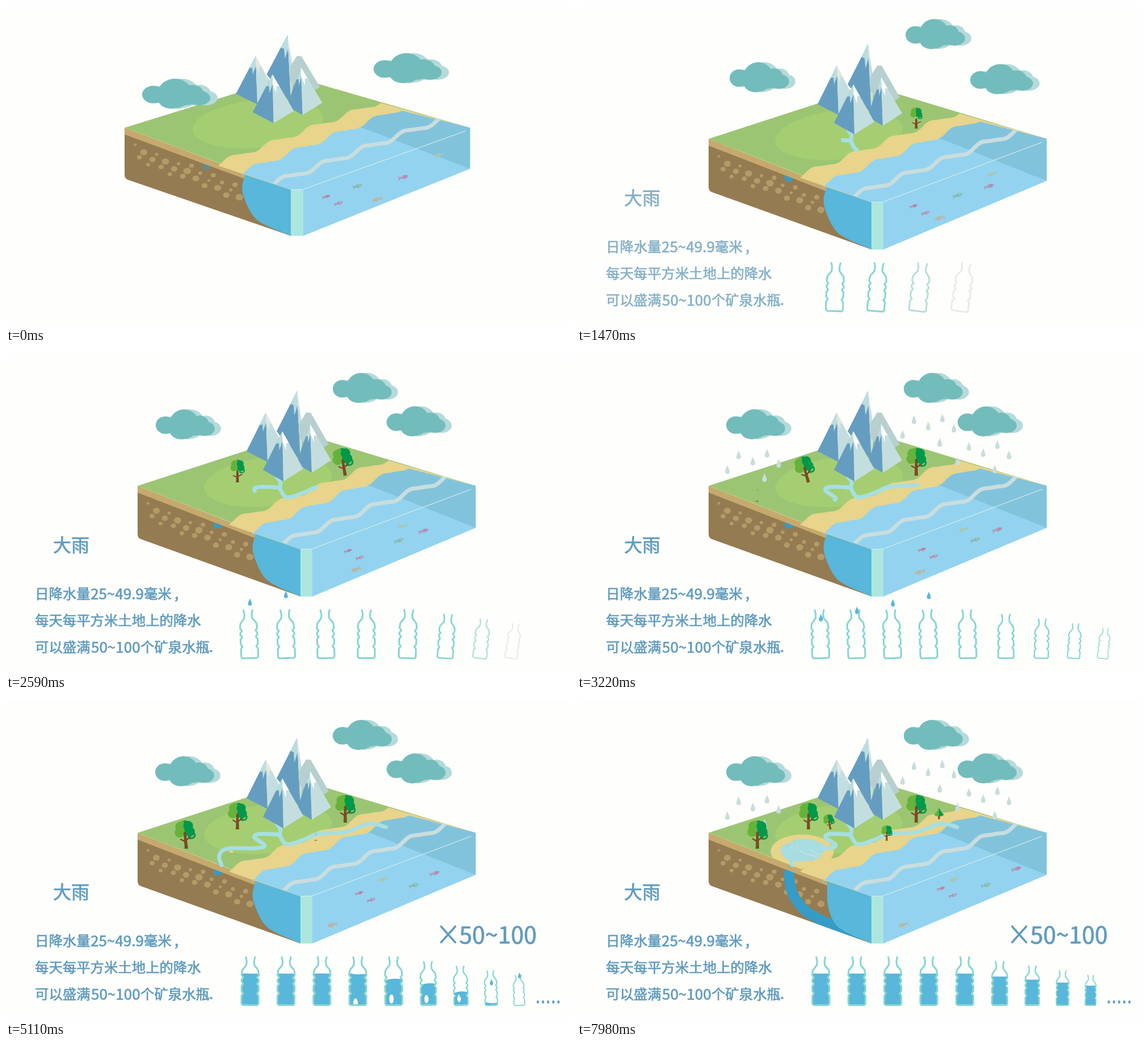
An HTML page with a canvas that plays this animation: 996x562 px, repeating every 8000 ms.

```html
<!DOCTYPE html>
<html lang="zh">
<head>
<meta charset="utf-8">
<style>
html, body { margin: 0; width: 100%; height: 100%; overflow: hidden; background: #fefefc; }
canvas { display: block; }
</style>
</head>
<body>
<canvas id="stage" width="996" height="562"></canvas>
<script>
const ctx = document.getElementById('stage').getContext('2d');
const LOOP = 8000;
const FONT = '"Noto Sans CJK SC", "Noto Sans CJK", sans-serif';
const BLUE = [95, 155, 190], CREAM = [240, 237, 229], TEAL = [132, 214, 208];

// Linear keyframes: time, value, time, value, ...
function at(t, ...k) {
  if (t <= k[0]) return k[1];
  for (let i = 2; i < k.length; i += 2)
    if (t < k[i]) return k[i - 1] + (k[i + 1] - k[i - 1]) * (t - k[i - 2]) / (k[i] - k[i - 2]);
  return k[k.length - 1];
}
const mix = (a, b, p) => `rgb(${a.map((v, i) => Math.round(v + (b[i] - v) * p))})`;

function fill(color, path) {
  ctx.fillStyle = color;
  ctx.fill(path instanceof Path2D ? path : new Path2D(path));
}
function stroke(color, width, path) {
  ctx.strokeStyle = color;
  ctx.lineWidth = width;
  ctx.stroke(path instanceof Path2D ? path : new Path2D(path));
}
function oval(color, x, y, rx, ry = rx) {
  ctx.fillStyle = color;
  ctx.beginPath();
  ctx.ellipse(x, y, rx, ry, 0, 0, 7);
  ctx.fill();
}
function placed(x, y, draw, sx = 1, sy = sx, degrees = 0) {
  ctx.save();
  ctx.translate(x, y);
  ctx.rotate(degrees * Math.PI / 180);
  ctx.scale(sx, sy);
  draw();
  ctx.restore();
}
function clipped(path, draw) {
  ctx.save();
  ctx.clip(path);
  draw();
  ctx.restore();
}
const polygon = (points, rest = '') => new Path2D('M' + points.join('L') + rest);

// Smooth curve through a few points, STEPS samples for each span
const STEPS = 12;
function curve(...points) {
  const out = [], last = points.length - 1;
  const pt = i => points[Math.max(0, Math.min(last, i))];
  for (let s = 0; s <= last * STEPS; s++) {
    const i = Math.min(last - 1, Math.floor(s / STEPS)), u = s / STEPS - i;
    out.push([0, 1].map(c => {
      const [a, b, d, e] = [-1, 0, 1, 2].map(k => pt(i + k)[c]);
      return b + u / 2 * (d - a + u * (2 * a - 5 * b + 4 * d - e + u * (3 * (b - d) + e - a)));
    }));
  }
  return out;
}
const trace = (points, spans) => polygon(points.slice(0, Math.round(spans * STEPS) + 1));

// Skewed ripple along the line from (x0, y0) to (x1, y1), steepest at x = crest
function ripple(x0, y0, x1, y1, crest) {
  return Array.from({ length: 141 }, (_, i) => {
    const x = x0 + (x1 - x0) * i / 140, a = (x - crest) / 69 * 2 * Math.PI;
    return [x, y0 + (y1 - y0) * i / 140 - 4.5 * (Math.sin(a) + .25 * Math.sin(2 * a))];
  });
}
const SAND = polygon(ripple(393, 298, 674, 187, 471), 'L828,234L519,346Z');
const seaShore = ripple(432, 315, 710, 199, 512);
const SEA = polygon(seaShore, 'L828,234V308L540,429V345L519,346L441,318Z');
const FAR_SEA = polygon([[634, 231], ...seaShore.filter(p => p[0] > 640)], 'L828,234V308Z');
const FOAM = polygon(ripple(486, 335, 779, 219, 631));
const TOP = new Path2D('M232,234L519,141L828,234L519,346Z');
const SIDE = new Path2D('M232,238L519,346V429L238,328Q232,326 232,319Z');

const trunk = curve([478, 219], [484, 228], [482, 237]);
const leftBranch = curve([482, 237], [447, 236], [438, 242], [456, 256], [440, 261], [390, 262], [376, 274], [380, 291]);
const rightBranch = curve([482, 237], [495, 254], [525, 246], [550, 236], [600, 232], [640, 218], [670, 224]);
const channel = curve([373, 299], [378, 335], [397, 366], [425, 385], [465, 402], [500, 414]);

function drawStones() {
  for (let i = 0; i < 25; i++) {
    const x = 250 + i * 7.5, depth = 28 + i * .618 % 1 * 32;
    oval('#b39b68', x, 238 + (x - 232) * .377 + depth - 8, 2.5 + i * .414 % 1 * 4.3, 2.4 + i * .414 % 1 * 3.6);
  }
}

// Two faces and a zigzag snow cap, placed by fractions of the slopes
function mountain(peak, left, base, right, snow) {
  const down = (side, towardBase, u) => peak.map((p, i) => p + (side[i] + (base[i] - side[i]) * towardBase - p) * u);
  const cap = side => polygon([peak, down(side, 0, .32), down(side, .35, .28), down(side, .6, .42), down(side, 1, .2)], 'Z');
  fill('#659dc0', polygon([peak, left, base], 'Z'));
  fill('#c4dedf', polygon([peak, base, right], 'Z'));
  fill('#b9dedf', cap(left));
  fill(snow, cap(right));
}

function drawMountains() {
  mountain([513, 67], [477, 138], [519, 190], [524, 140], '#e6e6df');
  fill('#b8cfcf', 'M529,105H537L569,161L545,176L517,150V125Z');
  mountain([458, 105], [424, 173], [461, 192], [490, 166], '#e6e6df');
  mountain([536, 125], [512, 195], [539, 211], [573, 189], '#fff');
  mountain([487, 138], [453, 206], [489, 226], [524, 204], '#fff');
}

function drawBlock(t) {
  ctx.lineCap = 'butt';
  fill('#957b51', SIDE);
  drawStones();
  ctx.globalAlpha = at(t, 0, .55, 500, 1);
  fill('#349cc6', 'M365,298L381,304L378,309L368,309Z');
  ctx.globalAlpha = 1;
  if (t > 5950) clipped(SIDE, () => stroke('#349cc6', at(t, 5950, 10, 7900, 18), trace(channel, at(t, 5950, .3, 7700, 5))));
  fill('#c6a96c', 'M232,234L441,316V327L232,246Z');
  const bulge = at(t, 7560, 1, 7940, 0);
  fill('#58b7da', `M441,318Q${441 - 8 * bulge},335 ${441 - 6 * bulge},350C${442 - 2 * bulge},368 448,388 460,400C474,411 496,419 519,429V346Z`);

  fill('#9cc573', TOP);
  placed(462, 227, () => oval('#a5ce72', 0, 0, 113, 43), 1, 1, -6);
  fill('#e8d48b', SAND);
  drawPond(t);
  fill('#93d3ef', SEA);
  fill('#82c3dc', FAR_SEA);
  clipped(TOP, () => stroke('#c9dddd', 7, FOAM));
  fill('#abe7df', 'M519,346L540,345V429H519Z');
  stroke('#d9edea', 1.2, 'M519,346L540,345L820,240');
  drawFish(t);

  ctx.lineCap = ctx.lineJoin = 'round';
  const river = (points, spans) => { if (spans > 0) stroke('#a6dfe3', 7, trace(points, spans)); };
  river(trunk, at(t, 600, 0, 950, 2));
  river(leftBranch, at(t, 1000, 0, 2030, 1, 3220, 3.3, 4700, 7));
  river(rightBranch, at(t, 1000, 0, 2030, 2, 4400, 6));
  drawMountains();
}

function drawPond(t) {
  const bank = at(t, 4950, 0, 6860, .8, 7700, 1);
  const water = at(t, 5900, 0, 6860, .68, 7800, 1);
  clipped(TOP, () => oval('#e8d48b', 397, 267, 55.5 * bank, 30 * bank));
  placed(398, 264, () => {
    fill('#a8dcdf', 'M-40,2Q-36,-12 -22,-12Q-14,-22 2,-19Q16,-21 23,-15Q40,-13 40,0Q34,6 31,12Q20,22 6,19Q-12,24 -22,17Q-32,18 -35,10Z');
    if (t > 7200) stroke('#cfe2e2', 1.5, 'M-22,-6Q-16,-1 -10,0T2,5T14,9T28,16M-12,-9Q-5,-3 2,-3T18,3T30,8');
  }, water);
}

function fish(color, belly, x, y, size, facing = 1) {
  placed(x, y, () => {
    fill(color, 'M-9,-3Q-6,0 -9,4L-4,1Q2,6 8,0Q3,-5 -4,-1Z');
    oval(belly, 3, 0, 2.6, 1.8);
  }, size * facing, size, -17);
}

function drawFish(t) {
  const p = t / LOOP, dx = -7 + 76 * p - 14 * p * p, dy = -.42 * dx;
  fish('#b28fb3', '#bd809c', 587 + dx, 355 + dy, .9);
  fish('#b28fb3', '#c4a9c4', 608 + dx, 367 + dy, .95);
  fish('#ab9dbd', '#b58aa9', 720 + dx, 320 + dy, 1.15);
  const green = 1 - (1 - Math.min(1, t / 6000)) ** 2;
  const yellow = Math.min(1, t / 3800), orange = Math.min(1, t / 4700);
  fish('#83b9b5', '#9cc3ac', 634 + 87 * green, 339 - 13 * green, 1.1);
  fish('#a5c8b4', '#b2c7a6', 774 - 110 * yellow, 283 + 33 * yellow, 1.05, -1);
  fish('#b4b8aa', '#c3b49b', 668 - 93 * orange, 363 + 33 * orange, 1.15, -1);
}

function tree(t, x, y, size, start) {
  const age = t - start;
  if (age < 0) return;
  const grown = at(age, 40, .05, 280, .38, 1150, .94, 1500, 1);
  const lean = at(age, 1180, 0, 1450, -16, 2200, 0);
  placed(x, y, () => {
    placed(0, at(age, 40, -20, 1100, -31), () => {
      for (const [color, side] of [['#67b23a', -1], ['#00984a', 1]]) {
        oval(color, 9 * side, 2, 8.5);
        oval(color, 7 * side, -8, 8.5);
        fill(color, `M0,-18Q${8 * side},-18 ${9 * side},-12V9H0Z`);
      }
      stroke('#00984a', 3, 'M8,5Q16,3 17,8Q17,14 10,14Q6,14 6,11');
    }, grown);
    placed(0, 0, () => {
      fill('#7a4b23', 'M-3,0L-2,-29H2L3,0Z');
      stroke('#7a4b23', 2.4, 'M0,-12L-8,-17M0,-14L9,-20');
    }, at(age, 0, .6, 1100, 1), grown);
  }, size, size, lean);
}

function sapling(t, x, y, start) {
  placed(x, y, () => {
    fill('#7a4b23', 'M-1.5,0V-10H1.5V0Z');
    fill('#67b23a', 'M0,-20Q-4,-12 -9,-8Q-5,-4 0,-5Z');
    fill('#00984a', 'M0,-20Q4,-12 9,-8Q5,-4 0,-5Z');
  }, at(t, start, 0, start + 330, 1));
}

function drawTrees(t) {
  tree(t, 598, 216, 1, 840);
  tree(t, 408, 228, .96, 1750);
  tree(t, 318, 262, 1.02, 3180);
  tree(t, 447, 228, .55, 6600);
  tree(t, 546, 248, .55, 5050);
  sapling(t, 638, 210, 7650);
}

function cloud(x, y, width) {
  const puffs = (color, dx) => {
    oval(color, 17 + dx, 28, 17, 15.5);
    oval(color, 50 + dx, 26, 26);
    oval(color, 45 + dx, 38, 20, 15);
    oval(color, 77 + dx, 27, 17, 16);
    oval(color, 86 + dx, 34, 18, 13);
    oval(color, 62 + dx, 33, 30, 14);
  };
  placed(x, y, () => { puffs('#b5dada', 11); puffs('#73bcbc', 0); }, width / 115, 1);
}

function drawClouds(t) {
  const width = at(t, 0, 133, 910, 117, 2000, 115);
  cloud(at(t, 0, 240, 910, 269, 2030, 269, 2700, 263), at(t, 0, 128, 910, 98, 2030, 100, 2700, 99), width);
  cloud(at(t, 0, 648, 910, 587, 1700, 576), at(t, 0, 83, 910, 30, 1350, 17, 1720, 35), width);
  ctx.globalAlpha = at(t, 650, 0, 850, 1);
  cloud(at(t, 650, 752, 910, 731, 1900, 664, 2600, 671), at(t, 650, 150, 910, 129, 1900, 82, 2600, 94),
    at(t, 910, 130, 2030, 115));
  ctx.globalAlpha = 1;
}

function drop(color, x, y, size = 1) {
  placed(x, y, () => fill(color, 'M0,-8C1,-4 4,0 4,3.5A4,4 0 0 1 -4,3.5C-4,0 -1,-4 0,-8Z'), size);
}

function drawRain(t) {
  const age = t < 7440 ? t - 2600 : t - 7440;
  if (age < 0) return;
  ctx.globalAlpha = at(age, 0, 0, 350, 1, 1800, 1, 2400, 0);
  for (const [x, y] of [[265, 193], [574, 131], [671, 178]])
    for (const [dx, dy] of [[0, 0], [20, -26], [45, -15], [70, -29], [65.5, 14], [90.5, -11]])
      drop('#cadcdc', x + dx, y + dy + age * .02);
  ctx.globalAlpha = 1;
}

// Neck, shoulder and a ribbed body; the second side mirrors the first
const halfBottle = [[8, -86], [6.5, -79], [7, -72], [14, -63], [15, -57]];
for (const rib of [-50, -39, -22]) halfBottle.push([15, rib - 4], [12, rib], [15, rib + 4]);
halfBottle.push([15, -4], [13, -1.5]);
const BOTTLE = polygon([...halfBottle.map(([x, y]) => [-x, y]), ...halfBottle.reverse()]);

function drawBottle(t, index) {
  const age = t - 520 - 280 * index;
  if (age < 0) return;
  const beyond = Math.max(0, index - 4);
  const size = 1 - .093 * beyond, x = 430 + 63.4 * index - 2 * beyond ** 2;
  const rain = t - (2030 + 298 * (index - beyond) + 42 * beyond ** 2);
  const slide = 58 * size ** 1.4 * Math.max(0, 1 - age / 1900) ** 1.3;
  const tilt = 9 * Math.cos(age / 2500 * Math.PI) * Math.exp(-age / 1800);
  placed(x + slide, 539, () => {
    const level = at(rain, 1450, 0, 2000, 1);
    if (level > 0) clipped(BOTTLE, () => {
      const top = -3 - 54 * level;
      const slosh = 10 * Math.sin(rain / 130) * at(rain, 1450, .6, 2800, 0);
      fill('#58b7da', `M-14,${top + slosh / 3}Q-4,${top - slosh} 14,${top - slosh / 4}V-3H-14Z`);
      if (rain > 1560 && rain < 2250) oval('#fff', -4, at(rain, 1560, -20, 2250, -4), 4, 8);
    });
    ctx.globalAlpha = at(age, 0, 0, 120, 1);
    stroke(mix(CREAM, TEAL, at(age, 60, 0, 650, 1)), 3, BOTTLE);
    ctx.globalAlpha = 1;
  }, size, size, tilt);
  if (rain >= 0 && rain < 1760) {
    const fall = rain < 1450 ? 414 + rain * .044 + Math.max(0, rain - 1200) ** 2 * .0008 : 480 + (rain - 1450) * .13;
    drop('#58b7da', x, 539 - (539 - fall) * size ** .6, .85 * Math.sqrt(size));
  }
}

function write(text, x, y, size) {
  ctx.font = `${size}px ${FONT}`;
  ctx.strokeStyle = ctx.fillStyle;
  ctx.lineWidth = .7;
  ctx.fillText(text, x, y);
  ctx.strokeText(text, x, y);
}

function drawText(t) {
  ctx.globalAlpha = at(t, 550, 0, 700, 1);
  ctx.fillStyle = mix(CREAM, BLUE, at(t, 600, 0, 1780, 1));
  write('大雨', 83, 350, 32);
  write('日降水量', 51, 433, 24.4);
  write('25~49.9', 149, 433.5, 26);
  write('毫米', 243, 433, 24.4);
  write(',', 297, 433, 26);
  write('每天每平方米土地上的降水', 51, 480, 24.4);
  write('可以盛满', 51, 527, 24.4);
  write('50~100', 150, 527.5, 26);
  write('个矿泉水瓶', 237, 527, 24.4);
  write('.', 358, 527, 26);

  ctx.globalAlpha = at(t, 4150, 0, 4300, 1);
  ctx.fillStyle = mix(CREAM, BLUE, at(t, 4150, 0, 4950, 1));
  write('50~100', 799, 429, 41);
  stroke(ctx.fillStyle, 3.6, 'M767,399L792,427M792,399L767,427');
  ctx.globalAlpha = 1;
  for (let i = 0; i < 5; i++) {
    const age = t - 3800 - i * 180;
    if (age > 0) oval(mix(CREAM, BLUE, at(age, 0, .2, 450, 1)), 937.5 + i * 9.1, 532, 2, 2.8);
  }
}

function draw(t) {
  ctx.fillStyle = '#fefefc';
  ctx.fillRect(0, 0, 996, 562);
  const squash = (1 - Math.min(1, t / 800)) ** 2;
  placed(-28.1 * squash, -14.5 * squash, () => drawBlock(t), 1 + .022 * squash, 1 - .022 * squash);
  ctx.lineCap = ctx.lineJoin = 'round';
  drawRain(t);
  drawTrees(t);
  drawClouds(t);
  for (let i = 0; i < 9; i++) drawBottle(t, i);
  drawText(t);
}

const begin = performance.now();
function frame() {
  draw((performance.now() - begin) % LOOP);
  requestAnimationFrame(frame);
}
frame();
</script>
</body>
</html>
```
